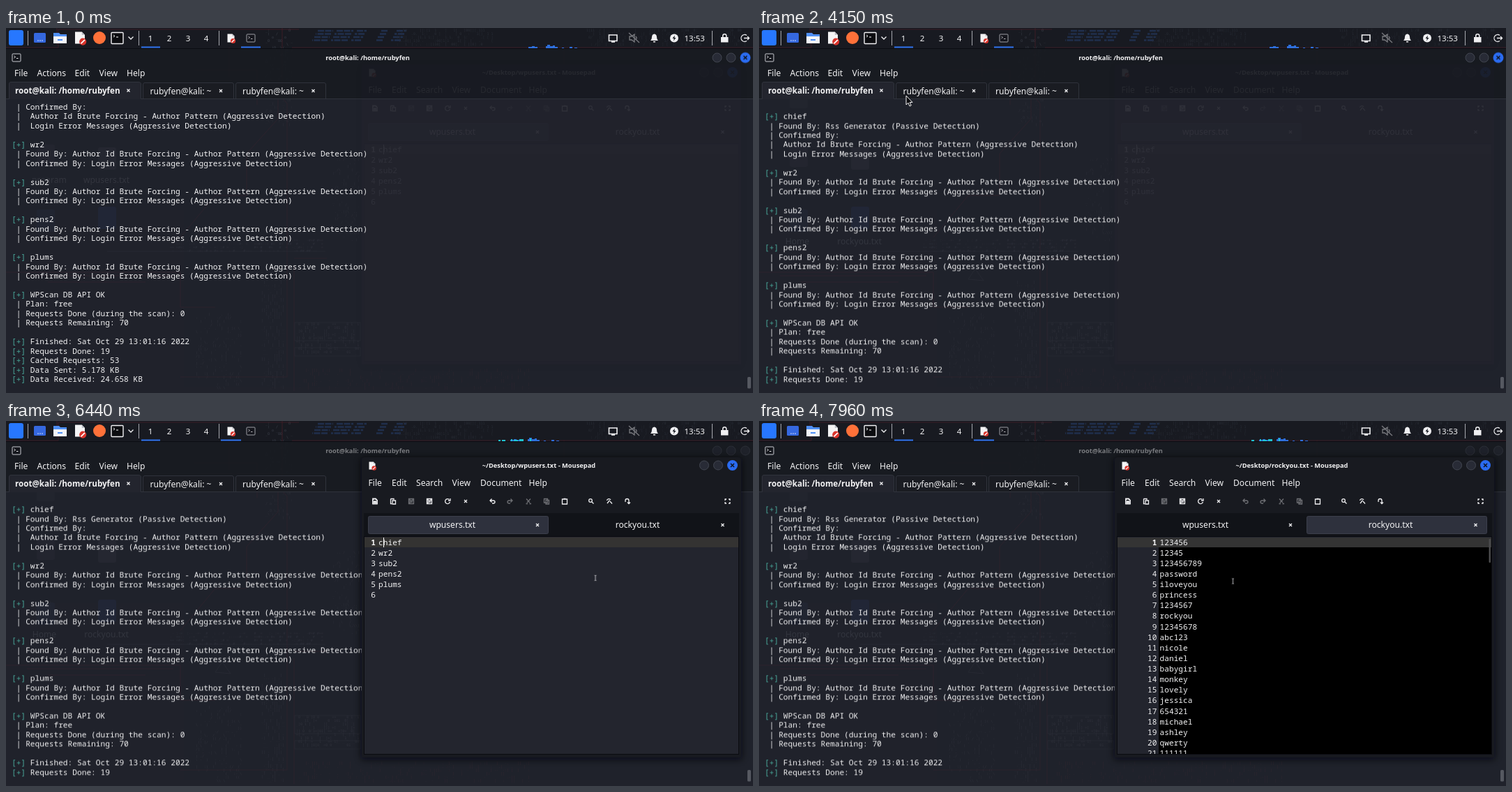
These frames come from a looping animation (1071 px wide and 523 px high, 8 s). An HTML page:

```html
<!DOCTYPE html>
<html lang="en">
<head>
<meta charset="utf-8">
<title>Terminal and editor</title>
<style>
html, body { margin: 0; width: 100%; height: 100%; overflow: hidden; background: #0d1018; }
svg { display: block; width: 1071px; height: 523px; }
text { white-space: pre; font: 12.1px "Noto Sans", "Open Sans", sans-serif; fill: #f2f2f3; }
text.mono { font: 11.2px "Noto Sans Mono", "DejaVu Sans Mono", monospace; }
text.code { font: 500 11.2px "Noto Sans Mono", "DejaVu Sans Mono", monospace; }
text.bold { font-weight: 700; font-size: 11.6px; }
text.title { font-weight: 700; font-size: 9.3px; text-anchor: middle; }
text.mid { text-anchor: middle; }
text.num { text-anchor: end; }
text.small { font-size: 11.5px; }
text.art { font: 5px "DejaVu Sans Mono", monospace; }
tspan.plus { fill: #49a99b; }
.line { fill: none; stroke: #f0f0f2; stroke-width: 1.3; }
.off { opacity: .4; }

.step { animation: 8s step-end infinite; }
.scroll { animation-name: scroll; }
.early { animation-name: early; }
.late { animation-name: late; }
.term { animation-name: term; }
.edit { animation-name: edit; }
.raise { animation-name: raise; }
.unfocus { animation-name: unfocus; }
.hover { animation-name: hover; }
.first { animation-name: first; }
.second { animation-name: second; }
.undo { animation-name: undo; }
.hand { animation-name: hand; }
.beam { animation-name: beam; }
.arrow { animation-name: arrow; }
.tip { animation-name: tip; }
.ibeam { animation-name: ibeam; }
.graph { animation: drift 8s steps(33) infinite; }
.pointer { animation: pointer 8s linear infinite; }

@keyframes scroll { 0% { transform: translateY(-40.34px); } 41%, 100% { transform: none; } }
@keyframes early { 0% { opacity: 1; } 41%, 100% { opacity: 0; } }
@keyframes late { 0% { opacity: 0; } 41%, 100% { opacity: 1; } }
@keyframes term { 0% { opacity: 1; } 64.75%, 100% { opacity: 0; } }
@keyframes edit { 0% { opacity: 0; } 64.75%, 100% { opacity: 1; } }
@keyframes raise { 0% { opacity: .06; } 64.75%, 100% { opacity: 1; } }
@keyframes unfocus { 0% { opacity: 1; } 64.75%, 100% { opacity: .45; } }
@keyframes hover { 0% { opacity: 0; } 89.9% { opacity: 1; } 95.5%, 100% { opacity: 0; } }
@keyframes first { 0% { opacity: 1; } 95.5%, 100% { opacity: 0; } }
@keyframes second { 0% { opacity: 0; } 95.5%, 100% { opacity: 1; } }
@keyframes undo { 0% { opacity: 1; } 95.5%, 100% { opacity: .4; } }
@keyframes hand { 0% { opacity: 0; } 3.25% { opacity: 1; } 32.1%, 100% { opacity: 0; } }
@keyframes beam { 0% { opacity: 0; } 32.1% { opacity: 1; } 50.1%, 100% { opacity: 0; } }
@keyframes arrow { 0% { opacity: 0; } 50.1% { opacity: 1; } 59.6%, 100% { opacity: 0; } }
@keyframes tip { 0% { opacity: 0; } 59.6% { opacity: 1; } 74% { opacity: 0; } 85.5% { opacity: 1; } 96.5%, 100% { opacity: 0; } }
@keyframes ibeam { 0% { opacity: 0; } 74% { opacity: 1; } 85.5% { opacity: 0; } 96.5%, 100% { opacity: 1; } }
@keyframes drift { to { transform: translateX(-33px); } }
@keyframes pointer {
  0%, 3.25% { transform: translate(350px, 32px); }
  8% { transform: translate(258px, 170px); }
  12.75% { transform: translate(176px, 286px); }
  19.6%, 50% { transform: translate(128.5px, 252.5px); }
  51.8%, 52.2% { transform: translate(211px, 97px); }
  59.6% { transform: translate(288px, 9px); }
  63%, 68.5% { transform: translate(328px, 20px); }
  70% { transform: translate(437px, 75px); }
  74% { transform: translate(620px, 180px); }
  78% { transform: translate(720px, 236px); }
  80.5% { transform: translate(845px, 225px); }
  83% { transform: translate(862px, 188px); }
  87.4% { transform: translate(876px, 169px); }
  89.9%, 95.5% { transform: translate(877px, 157px); }
  99.3%, 100% { transform: translate(679.5px, 229.5px); }
}
</style>
</head>
<body>
<svg viewBox="0 0 1071 523">
  <defs>
    <clipPath id="view"><rect y="107" width="1071" height="403"/></clipPath>
    <clipPath id="editor"><rect x="514" y="167" width="536" height="310"/></clipPath>
    <clipPath id="meter"><rect x="706" y="23" width="152" height="6"/></clipPath>
    <filter id="soft" x="-10%" y="-10%" width="120%" height="120%"><feGaussianBlur stdDeviation="5"/></filter>
    <g id="page">
      <path d="M-5-6H2L5-3V6H-5Z" fill="#f4f4f5"/>
      <path d="M2-6 5-3H2Z" fill="#b5b8c0"/>
      <circle cx="3" cy="4" r="3.6" fill="#d8342c"/>
      <path d="M1 6 5 2" stroke="#fff" stroke-width="1.2"/>
    </g>
    <g id="shell">
      <rect x="-6" y="-5.5" width="12" height="11" rx="1" fill="#14161c" stroke="#c9cbd1"/>
      <path d="M-3.5-2.5-1.5-1-3.5.5M0 1H2.5" fill="none" stroke="#e6e6e8"/>
    </g>
    <g id="buttons">
      <circle cx="-40.5" r="6.5" fill="#282b36" stroke="#434751"/>
      <circle cx="-20.5" r="6.5" fill="#282b36" stroke="#434751"/>
    </g>
    <g id="close">
      <circle r="7.5" fill="#2a6bf0"/>
      <path d="M-2.5-2.5 2.5 2.5M2.5-2.5-2.5 2.5" stroke="#101522" stroke-width="1.6"/>
    </g>
    <path id="x" d="M-2-2 2 2M2-2-2 2" stroke="#f0f0f2" stroke-width="1.3"/>
    <path id="bar" d="M-1.8-5Q0-5 0-4Q0-5 1.8-5M-1.8 5Q0 5 0 4Q0 5 1.8 5M0-4V4" fill="none"/>
    <path id="pick" d="M0 0V13L3 10.2 5 15 7.2 14 5.2 9.5H9Z"/>
  </defs>

  <rect width="1071" height="523" fill="#0d1018"/>
  <g id="wall"></g>

  <!-- top panel -->
  <rect width="1071" height="29" fill="#1e2027" fill-opacity=".64"/>
  <g clip-path="url(#meter)">
    <g class="graph">
      <path fill="#2f6fdb" d="M749 29V27H754V26H758V27H762V29ZM774 29V26H776V24H780V26H784V25H787V27H791V29ZM797 29V28H800V29ZM808 29V27H812V29ZM815 29V28H819V29Z"/>
      <path class="step edit" fill="#20c3d0" d="M730 29V27H735V29ZM737 29V27H742V29ZM750 29V26H752V29ZM754 29V27H760V29ZM762 29V26H768V29ZM777 29V25H779V29Z"/>
    </g>
  </g>
  <rect x="4" y="3" width="21" height="22" rx="3" fill="#2777ff"/>
  <path d="M31.5 4V25M190.5 4V25M305.5 4V25M1012.5 4V25" stroke="#a6a8ae"/>
  <rect x="40" y="7" width="17" height="14" rx="1.5" fill="#3568df"/>
  <path d="M45 18H53" stroke="#cfdcff" stroke-dasharray="2 1"/>
  <path d="M68 7H76L78 9H87V15H68Z" fill="#4f8ff5"/>
  <path d="M68 12H87V22H68Z" fill="#f1f4fa"/>
  <path d="M74 17H81" stroke="#4f8ff5" stroke-width="2"/>
  <use href="#page" transform="translate(106 14)scale(1.4)"/>
  <circle cx="134" cy="14" r="9" fill="#ff7139"/>
  <rect x="151" y="6.5" width="17" height="16" rx="1" fill="#0b0c10" stroke="#f0f0f2" stroke-width="1.4"/>
  <path d="M154 10 156 11.5 154 13M158 13H161" fill="none" stroke="#fff"/>
  <path d="M175.5 12.5 179 16 182.5 12.5" class="line"/>
  <rect x="194" y="26.5" width="27" height="2" fill="#2f72ee"/>
  <text class="small mid" x="207" y="18.5">1</text><text class="small mid" x="234" y="18.5">2</text>
  <text class="small mid" x="261" y="18.5">3</text><text class="small mid" x="287" y="18.5">4</text>
  <use href="#page" x="322.5" y="14.5"/>
  <use href="#shell" x="351" y="14.5" opacity=".75"/>
  <rect class="step term" x="337" y="26.5" width="28" height="2" fill="#2f72ee"/>
  <rect class="step edit" x="308" y="26.5" width="29" height="2" fill="#2f72ee"/>
  <g class="line">
    <path d="M864.5 10H876V18.5H864.5ZM868 20H873" stroke-width="1.6"/>
    <g opacity=".45"><path d="M894 12H897L901 9V20L897 17H894ZM903 12Q905 14.5 903 17M893 7 908 21"/></g>
  </g>
  <path d="M924 18Q926 16 926 13Q926 9 929.5 8.5Q933 9 933 13Q933 16 935 18ZM928 19H931V20.5H928Z" fill="#f0f0f2"/>
  <circle cx="958" cy="14.5" r="6" fill="#f0f0f2"/>
  <path d="M959 10.5 955.5 15H957.8L957 18.5 960.5 14H958.3Z" fill="#12151d"/>
  <text class="small" x="972.5" y="18.5">13:53</text>
  <path d="M1025 13H1035.5V20.5H1025ZM1027 13V11Q1027 8 1030.3 8Q1033.5 8 1033.5 11V13H1032V11Q1032 9.5 1030.3 9.5Q1028.5 9.5 1028.5 11V13Z" fill="#f0f0f2"/>
  <path d="M1062 10.5A5 5 0 1 0 1062 18.5M1058 14.5H1065M1063 12 1065.5 14.5 1063 17" class="line"/>

  <!-- terminal -->
  <rect x="510" y="52" width="544" height="430" fill="#20222a"/>
  <rect y="29" width="1071" height="494" fill="#23252e" fill-opacity=".88"/>
  <rect y="29" width="1071" height="73" fill="#181a20" fill-opacity=".82"/>
  <path d="M0 29.5H1071" stroke="#0b0d13"/>
  <use href="#shell" x="15" y="42.5"/>
  <g class="step unfocus">
    <text class="title" x="518.5" y="46">root@kali: /home/rubyfen</text>
    <use href="#buttons" x="1060" y="42.5"/>
  </g>
  <circle class="step unfocus" cx="1060" cy="42.5" r="6.5" fill="#282b36" stroke="#434751"/>
  <use href="#close" class="step term" x="1060" y="42.5"/>
  <text x="12" y="69">File</text><text x="44.5" y="69">Actions</text><text x="98.5" y="69">Edit</text>
  <text x="133.5" y="69">View</text><text x="173" y="69">Help</text>
  <g fill="#1a1c22" stroke="#30333c">
    <path d="M4.5 102V80Q4.5 77.5 7 77.5H190Q193.5 77.5 193.5 80V102" fill="#23252e"/>
    <path d="M196.5 101.5V81Q196.5 78.5 199 78.5H324Q326.5 78.5 326.5 81V101.5ZM329.5 101.5V81Q329.5 78.5 332 78.5H456Q458.5 78.5 458.5 81V101.5Z"/>
    <path d="M194 101.5H1071M0 101.5H4" fill="none"/>
  </g>
  <text class="bold" x="13" y="94">root@kali: /home/rubyfen</text>
  <text x="206.5" y="94.5">rubyfen@kali: ~</text><text x="339" y="94.5">rubyfen@kali: ~</text>
  <use href="#x" x="175.5" y="89.5"/><use href="#x" x="308" y="90"/><use href="#x" x="440.5" y="90"/>
  <g clip-path="url(#view)"><g id="log" class="step scroll"></g></g>
  <rect x="1063" y="500" width="5" height="16.5" rx="1.5" fill="#565961"/>

  <!-- editor -->
  <g class="step raise">
    <rect x="508" y="52" width="548" height="434" rx="6" fill="#05060a" opacity=".6" filter="url(#soft)"/>
    <path d="M510 482V57Q510 52 515 52H1049Q1054 52 1054 57V482Z" fill="#181a20"/>
    <rect x="513" y="132" width="538" height="34" fill="#111318"/>
    <use href="#page" transform="translate(525 64)scale(.9)"/>
    <text class="title step first" x="764" y="67">~/Desktop/wpusers.txt - Mousepad</text>
    <text class="title step second" x="764" y="67">~/Desktop/rockyou.txt - Mousepad</text>
    <use href="#buttons" x="1041.5" y="63.5"/><use href="#close" x="1041.5" y="63.5"/>
    <text x="519.5" y="92.5">File</text><text x="553" y="92.5">Edit</text><text x="588" y="92.5">Search</text>
    <text x="639.5" y="92.5">View</text><text x="680" y="92.5">Document</text><text x="749.5" y="92.5">Help</text>
    <g class="line">
      <path d="M526 111.5H530L532 113.5V118.5H526ZM527 116H531M529 114V118" stroke-width="1.8"/>
      <path d="M551.5 111.5H556V113M551.5 111.5V118.5H553M554 114H558.5V119H554Z"/>
      <path class="off" d="M577.5 111.5H584.5V118.5H577.5ZM579 111.5V114H583V111.5M579 118V116H583"/>
      <path d="M603.5 111.5H610.5V118.5H603.5ZM605 111.5V114H609V111.5M605 118V116H609"/>
      <path d="M635.5 112.5A3.5 3.5 0 1 0 636.5 116M637 111V114H634"/>
      <path class="step undo" d="M694 114H698.5Q701 114 701 116Q701 118 698.5 118H697M696.5 111.5 694 114 696.5 116.5"/>
      <path class="off" d="M726 114H721.5Q719 114 719 116Q719 118 721.5 118H723M723.5 111.5 726 114 723.5 116.5"/>
      <path class="off" d="M746 111.5 751 117M752 111.5 747 117M745.5 118.5H748M750.5 118.5H753"/>
      <path class="off" d="M771.5 111.5H776.5V117H771.5ZM774 113.5H778.5V119H774Z"/>
      <path d="M797.5 112H804.5V119H797.5ZM799.5 111.5H802.5"/>
      <circle cx="838" cy="114" r="2.3"/><path d="M840 116 842.5 118.5"/>
      <path d="M861.5 114A3 3 0 0 1 867 113M866 115 869 118.5M862 118 865.5 113.5"/>
      <path d="M888 116V114Q888 111.5 890.5 111.5Q893 111.5 893 114V118M891 116.5 893 118.5 895 116.5"/>
      <path d="M1031 114V112H1033M1036 112H1038V114M1038 116V118H1036M1033 118H1031V116"/>
    </g>
    <use href="#x" x="659" y="115"/>
    <g fill="#2e313d" stroke="#3c3f4b">
      <rect class="step first" x="519.5" y="136.5" width="258" height="25" rx="2"/>
      <rect class="step hover" x="785.5" y="136.5" width="258" height="25" rx="2" fill="#1c1e26" stroke="#2b2e38"/>
      <rect class="step second" x="785.5" y="136.5" width="258" height="25" rx="2"/>
    </g>
    <text class="mid" x="640" y="153">wpusers.txt</text><text class="mid" x="905.5" y="153">rockyou.txt</text>
    <use href="#x" x="762" y="149"/><use href="#x" x="1027.5" y="149"/>
    <rect x="513.5" y="165.5" width="537" height="312" fill="#23252e" stroke="#0a0b10"/>
    <g class="step first">
      <rect x="514" y="166.5" width="536" height="14.5" fill="#343332"/>
      <g id="users"></g>
      <path d="M541.5 167V181" stroke="#fff"/>
    </g>
    <g class="step second" clip-path="url(#editor)">
      <rect x="573" y="166" width="477" height="311" fill="#000"/>
      <rect x="514" y="166.5" width="536" height="14.5" fill="#343434"/>
      <g id="words"></g>
      <rect x="1046.5" y="169" width="2.5" height="34" rx="1" fill="#4b4b4d"/>
    </g>
  </g>

  <g class="pointer">
    <path class="step hand" d="M-1 0Q0-1 1 0V4L4 5Q5 6 4.5 10H-.5L-3.5 6Q-3 5-1 6Z" fill="#fff" stroke="#111" stroke-width=".5"/>
    <g class="step beam" transform="translate(0 1)"><use href="#bar" transform="scale(1.25)" stroke="#f5f5f5" stroke-width="1.2"/></g>
    <use href="#pick" class="step arrow" fill="#0a0b0e" stroke="#f5f5f5"/>
    <g class="step tip"><use href="#pick" transform="scale(.5)" fill="#0a0b0e" stroke="#d8d8da" stroke-width="1.5"/></g>
    <g class="step ibeam"><use href="#bar" transform="scale(.75)" stroke="#cfcfd2" stroke-width="1.2"/></g>
  </g>
</svg>

<script>
const put = (id, html) => { document.getElementById(id).innerHTML = html; };
const text = (x, y, s, attrs) => `<text x="${x}" y="${y}" ${attrs}>${s}</text>`;

// scan log
const found = ' | Found By: Author Id Brute Forcing - Author Pattern (Aggressive Detection)';
const login = 'Login Error Messages (Aggressive Detection)';
const user = name => ['[+] ' + name, found, ' | Confirmed By: ' + login, ''];
const log = [
  '', '[+] chief', ' | Found By: Rss Generator (Passive Detection)', ' | Confirmed By:',
  ' |  Author Id Brute Forcing - Author Pattern (Aggressive Detection)', ' |  ' + login, '',
  ...['wr2', 'sub2', 'pens2', 'plums'].flatMap(user),
  '[+] WPScan DB API OK', ' | Plan: free', ' | Requests Done (during the scan): 0',
  ' | Requests Remaining: 70', '',
  '[+] Finished: Sat Oct 29 13:01:16 2022', '[+] Requests Done: 19', '[+] Cached Requests: 53',
  '[+] Data Sent: 5.178 KB', '[+] Data Received: 24.658 KB'
];
put('log', log.map((s, i) => text(8, 117 + i * 13.448,
  s.replace('[+]', '<tspan class="plus">[+]</tspan>'), 'class="mono"')).join(''));

// editor lists
const list = (items, edge) => items.map((s, i) => {
  const y = 177.5 + i * 15.13;
  return text(edge, y, i + 1, `class="code num" ${i ? '' : 'style="font-weight:700"'}`) +
    text(edge + 4, y, s, 'class="code"');
}).join('');
put('users', list(['chief', 'wr2', 'sub2', 'pens2', 'plums', ''], 530));
put('words', list(('123456 12345 123456789 password iloveyou princess 1234567 rockyou 12345678 abc123 ' +
  'nicole daniel babygirl monkey lovely jessica 654321 michael ashley qwerty 111111').split(' '), 570.5));

// wallpaper: seeded character art, circuit lines and desktop icons
let seed = 7;
const rand = () => (seed = seed * 16807 % 2147483647) / 2147483647;
const art = (x, y, cols, rows, set, color, fill = .6) => {
  let out = '';
  for (let r = 0; r < rows; r++) {
    let s = '';
    for (let c = 0; c < cols; c++) s += rand() < fill ? set[Math.floor(rand() * set.length)] : ' ';
    out += text(x, y + r * 5, s, `class="art" style="fill:${color}"`);
  }
  return out;
};
const stripes = [[447, 22], [474, 24], [503, 14], [538, 10], [560, 14]].map(([x, w]) =>
  `<path d="M${x} 4h${w}m-3 4.5h-${w}m-2 4.5h${w}m-3 4.5h-${w}" stroke="#234a91" stroke-width="2.5" stroke-dasharray="9 1.5" fill="none"/>`).join('');
const icon = (x, y, color) => `<rect x="${x - 13}" y="${y - 15}" width="26" height="32" rx="3" fill="${color}"/>`;
const label = (x, y, s) => text(x, y, s, 'class="mid" style="fill:#a2a6b0"');
put('wall', stripes +
  art(372, 5, 13, 28, '.:oO/\\()_', '#6f7888', .3) +
  art(560, 5, 46, 5, '01[]:.', '#39404f', .55) +
  art(832, 5, 76, 5, '01|/:[]', '#39404f', .4) +
  art(232, 306, 74, 4, '=-#:', '#6a7280', .55) +
  art(272, 412, 22, 22, '.-/\\:|()', '#7c8595', .28) +
  art(366, 366, 11, 31, '[]|_-', '#727b8b', .45) +
  art(416, 426, 30, 9, '01[]_=', '#7c8595', .4) +
  art(468, 190, 13, 24, '/\\_(.)', '#6a7280', .28) +
  art(420, 492, 110, 6, '.:-[]', '#8c2c42', .25) +
  `<g fill="none" stroke="#b01c31" opacity=".6">
    <path d="M0 28H75V2H420M396 0V100L403 108V500H250M73 0V24M410 28H1071M280 75H390V130L345 180V240H300L250 300"/>
    <path d="M0 350H250V400H300M30 355H240M60 364H200M270 60H360V110M320 28V70M413 330H460M413 340V520M800 28V60H1000"/>
  </g>` +
  '<g stroke="#596070" fill="none" opacity=".7"><path d="M414 422H508V448H414ZM414 458H508V470H414ZM145 320H458M300 360 310 345 322 362Z"/></g>' +
  '<g opacity=".75">' + icon(57, 98, '#2c313c') + icon(57, 182, '#343944') + icon(145, 186, '#4a4f5a') +
  icon(57, 275, '#22305c') + icon(145, 271, '#1d3f91') + '</g>' +
  `<g class="step early">${label(62, 222, 'program')}${label(144, 222, 'wpusers.txt')}</g>` +
  `<g class="step late">${label(55, 310, 'Home')}${label(144, 310, 'rockyou.txt')}</g>`);
</script>
</body>
</html>
```
